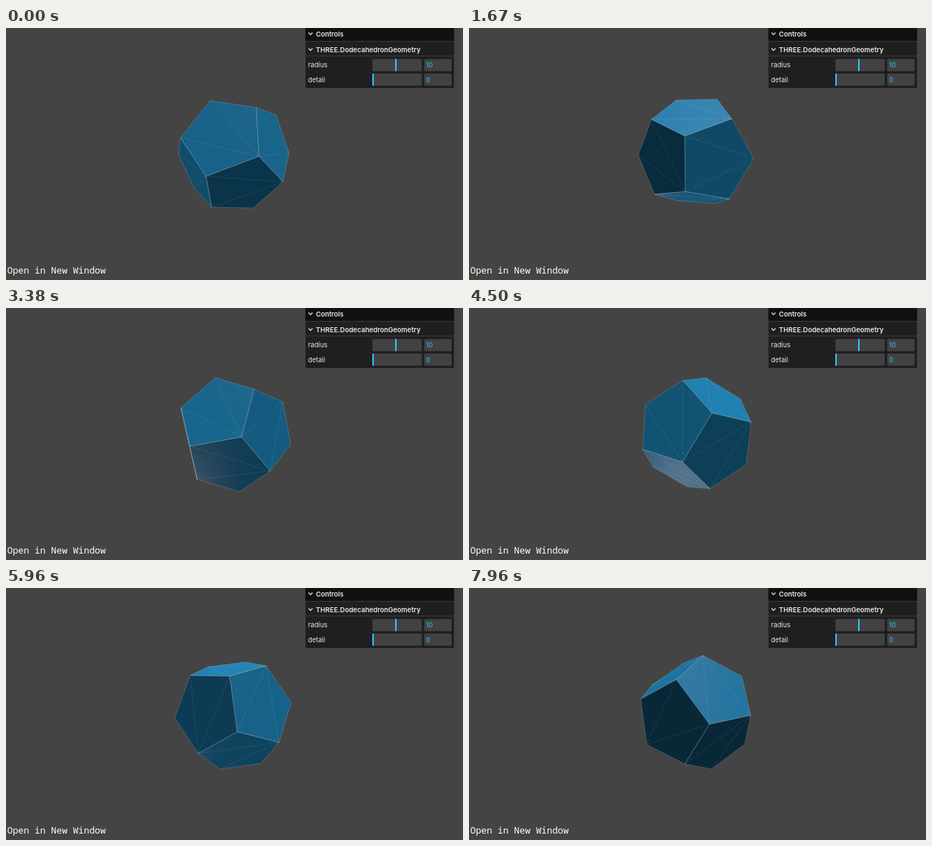
Write an HTML page with a canvas that moves like this. It is 640x353 px and loops after 8 s.

```html
<!DOCTYPE html>
<html lang="en">
<head>
<meta charset="utf-8">
<title>Dodecahedron</title>
<style>
  html, body { margin: 0; width: 640px; height: 353px; overflow: hidden; background: #444; }
  canvas, svg { position: absolute; left: 0; top: 0; }
  svg { font: 9.35px Inter, sans-serif; fill: #ebebeb; }
  .title { font-weight: 600; font-size: 9.45px; }
  .value, .mark { fill: #2cc9ff; }
  .widget { fill: #424242; }
  .chevron { fill: none; stroke: #ebebeb; stroke-width: 1.2; }
  .link { font: 12.78px "Noto Sans Mono", "DejaVu Sans Mono", monospace; fill: #fff; }
</style>
</head>
<body>
<canvas id="stage" width="640" height="353"></canvas>
<svg width="640" height="353">
  <rect x="419.4" width="208" height="84" fill="#1f1f1f"/>
  <rect x="419.4" width="208" height="18.3" fill="#111"/>
  <rect class="widget" x="419.4" y="18.3" width="208" height="0.85"/>
  <rect class="widget" x="419.4" y="38.7" width="208" height="0.85"/>
  <path class="chevron" d="M423.7 6.5l2.8 2.8 2.8-2.8M423.7 28.5l2.8 2.8 2.8-2.8"/>
  <text class="title" x="434" y="11.5">Controls</text>
  <text class="title" x="434" y="33.5">THREE.DodecahedronGeometry</text>

  <text x="423" y="55.2">radius</text>
  <rect class="widget" x="513.2" y="43.4" width="69" height="17" rx="1.7"/>
  <rect class="mark" x="545" y="43.4" width="2" height="17"/>
  <rect class="widget" x="585.6" y="43.4" width="38.4" height="17" rx="1.7"/>
  <text class="value" x="588.2" y="55.2">10</text>

  <text x="423" y="75.6">detail</text>
  <rect class="widget" x="513.2" y="63.8" width="69" height="17" rx="1.7"/>
  <rect class="mark" x="513" y="63.8" width="2" height="17"/>
  <rect class="widget" x="585.6" y="63.8" width="38.4" height="17" rx="1.7"/>
  <text class="value" x="588.2" y="75.6">0</text>

  <text class="link" x="1.8" y="344">Open in New Window</text>
</svg>
<script>
const ctx = document.getElementById('stage').getContext('2d');

const LOOP = 8000, STEP = 1000 / 24;
const START_ANGLE = 2.796, SPEED = 0.2992;   // radians, radians per second
const FOCAL = 232.5, CX = 318.4, CY = 175.5, CAMERA = [0, 0, 30];
const CELL = 3;

const dot = (a, b) => a[0] * b[0] + a[1] * b[1] + a[2] * b[2];
const add = (a, b) => a.map((v, i) => v + b[i]);
const scale = (a, k) => a.map(v => v * k);
const unit = a => scale(a, 1 / Math.hypot(...a));
const clamp = v => Math.min(1, Math.max(0, v));

const toLinear = v => (v /= 255) <= 0.04045 ? v / 12.92 : ((v + 0.055) / 1.055) ** 2.4;
const toSrgb = v => 255 * clamp(v <= 0.0031308 ? v * 12.92 : 1.055 * v ** (1 / 2.4) - 0.055);

const COLOR = [21, 98, 137].map(toLinear);
const EMISSIVE = [7, 37, 52].map(toLinear);
const SPECULAR = toLinear(17), SHININESS = 30, INTENSITY = 3;
const LIGHTS = [[0, 1, 0], [1, 2, 1], [-1, -2, -1]].map(unit);

// Cube corners followed by three golden rectangles, on a sphere of radius 10.
const T = (1 + Math.sqrt(5)) / 2, R = 1 / T;
const sign = (i, bit) => i & bit ? 1 : -1;
const range = n => [...Array(n).keys()];
const VERTICES = [
  ...range(8).map(i => [sign(i, 4), sign(i, 2), sign(i, 1)]),
  ...range(4).map(i => [0, sign(i, 2) * R, sign(i, 1) * T]),
  ...range(4).map(i => [sign(i, 2) * R, sign(i, 1) * T, 0]),
  ...range(4).map(i => [sign(i, 1) * T, 0, sign(i, 2) * R])
].map(v => scale(v, 10 / Math.sqrt(3)));

const FACES = [
  [3, 11, 7, 15, 13], [7, 19, 17, 6, 15], [17, 4, 8, 10, 6], [8, 0, 16, 2, 10],
  [0, 12, 1, 18, 16], [6, 10, 2, 13, 15], [2, 16, 18, 3, 13], [18, 1, 9, 11, 3],
  [4, 14, 12, 0, 8], [11, 9, 5, 19, 7], [19, 5, 14, 4, 17], [1, 12, 14, 5, 9]
];

// Turn about y, then about x, by the same angle.
function rotate([x, y, z], angle) {
  const c = Math.cos(angle), s = Math.sin(angle);
  const depth = z * c - x * s;
  return [x * c + z * s, y * c - depth * s, y * s + depth * c];
}

function project([x, y, z]) {
  const k = FOCAL / (CAMERA[2] - z);
  return [CX + x * k, CY - y * k];
}

// Flat Blinn-Phong shading; the highlight depends on the view direction.
function shade(normal, view) {
  let diffuse = 0, specular = 0;
  for (const light of LIGHTS) {
    const nl = clamp(dot(normal, light));
    if (!nl) continue;
    const half = unit(add(light, view));
    const vh = clamp(dot(view, half));
    const fresnel = 2 ** ((-5.55473 * vh - 6.98316) * vh);
    const reflect = SPECULAR * (1 - fresnel) + fresnel;
    const lobe = (SHININESS / 2 + 1) / (4 * Math.PI) * clamp(dot(normal, half)) ** SHININESS;
    diffuse += INTENSITY / Math.PI * nl;
    specular += INTENSITY * nl * reflect * lobe;
  }
  const rgb = COLOR.map((c, i) => Math.round(toSrgb(c * diffuse + EMISSIVE[i] + specular)));
  return `rgb(${rgb})`;
}

function fillFace(points, normal) {
  const xs = points.map(p => p[0]), ys = points.map(p => p[1]);
  const right = Math.max(...xs), bottom = Math.max(...ys);
  ctx.save();
  ctx.beginPath();
  points.forEach(p => ctx.lineTo(...p));
  ctx.clip();
  for (let y = Math.floor(Math.min(...ys)); y < bottom; y += CELL) {
    for (let x = Math.floor(Math.min(...xs)); x < right; x += CELL) {
      const view = unit([(CX - x - CELL / 2) / FOCAL, (y + CELL / 2 - CY) / FOCAL, 1]);
      ctx.fillStyle = shade(normal, view);
      ctx.fillRect(x, y, CELL, CELL);
    }
  }
  ctx.restore();
}

function line(a, b, alpha, dash = []) {
  ctx.strokeStyle = `rgba(255,255,255,${alpha})`;
  ctx.setLineDash(dash);
  ctx.beginPath();
  ctx.moveTo(...a);
  ctx.lineTo(...b);
  ctx.stroke();
}

function draw(seconds) {
  const solid = VERTICES.map(v => rotate(v, START_ANGLE + SPEED * seconds));
  const screen = solid.map(project);
  const edges = new Map();
  const diagonals = [];

  ctx.fillStyle = '#444';
  ctx.fillRect(0, 0, 640, 353);
  for (const face of FACES) {
    const center = scale(face.map(i => solid[i]).reduce(add), 1 / 5);
    const normal = unit(center);
    if (dot(normal, CAMERA) <= dot(normal, center)) continue;
    fillFace(face.map(i => screen[i]), normal);
    diagonals.push([face[0], face[2]], [face[0], face[3]]);
    face.forEach((a, i) => {
      const b = face[(i + 1) % 5];
      const key = Math.min(a, b) * 20 + Math.max(a, b);
      edges.set(key, (edges.get(key) || 0) + 1);
    });
  }

  ctx.lineWidth = 0.75;
  for (const [a, b] of diagonals) line(screen[a], screen[b], 0.15, [5, 1.5, 2, 1.5]);
  for (const [key, uses] of edges) {
    line(screen[Math.floor(key / 20)], screen[key % 20], uses > 1 ? 0.4 : 0.22);
  }
}

function tick() {
  const time = performance.now() % LOOP;
  draw(Math.floor((time + 5) / STEP) * STEP / 1000);
  requestAnimationFrame(tick);
}
tick();
</script>
</body>
</html>
```
